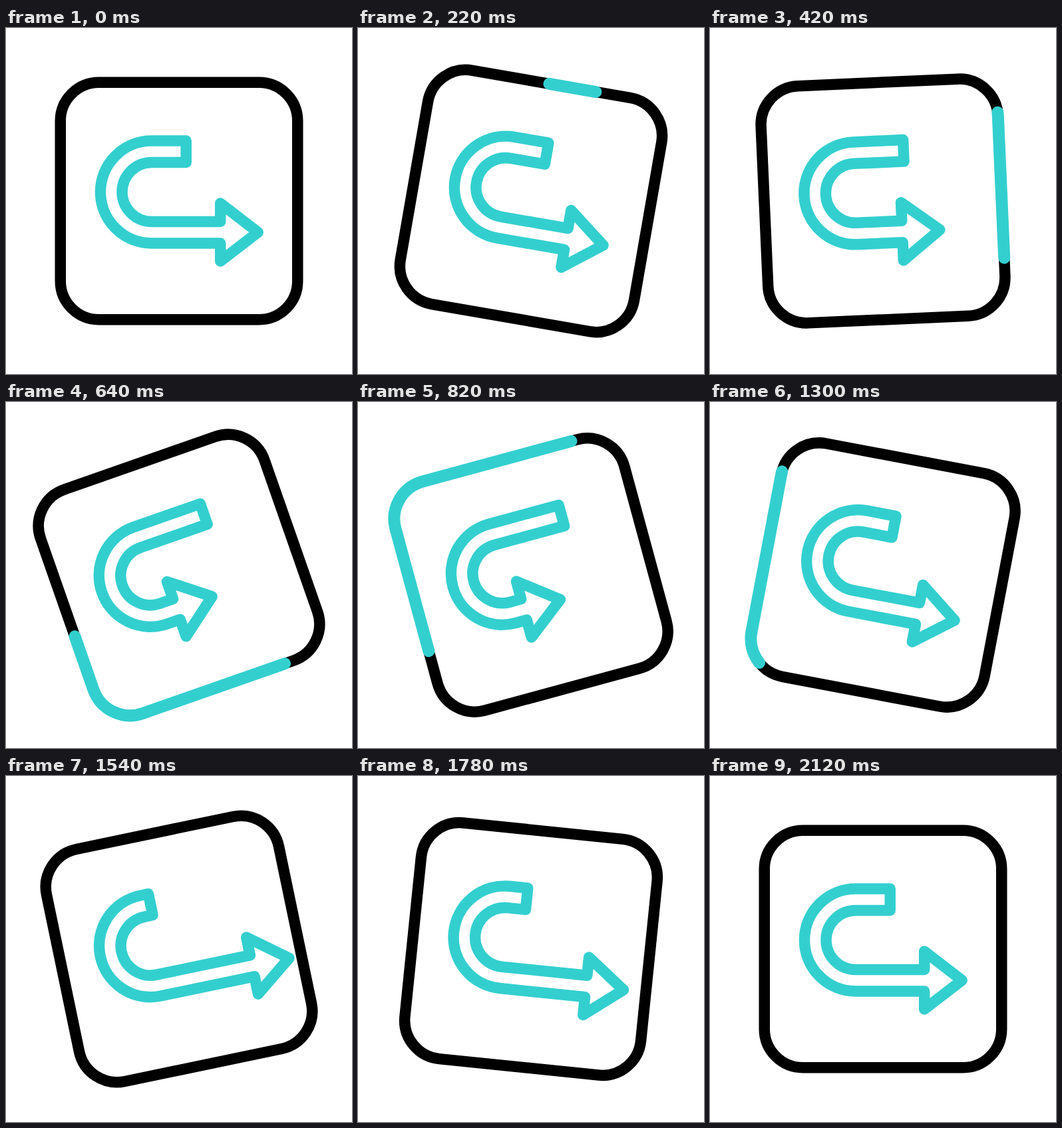
An HTML page that plays this animation: 520x520 px, repeating every 2720 ms.

```html
<!DOCTYPE html>
<html lang="en">
<head>
<meta charset="utf-8">
<title>Turning arrow</title>
<style>
  html, body { margin: 0; height: 100%; overflow: hidden; background: #fff; }
  svg { display: block; width: 100vw; height: 100vh; }
  rect, path { fill: none; stroke: #33cfcf; stroke-width: 16.5; stroke-linecap: round; stroke-linejoin: round; }
  #frame { stroke: #000; }
  #trail { stroke-width: 18; }
</style>
</head>
<body>
<svg viewBox="0 0 520 520">
  <g id="icon">
    <rect id="frame" x="81.75" y="81.75" width="356.5" height="356.5" rx="58"/>
    <rect id="trail" x="81.75" y="81.75" width="356.5" height="356.5" rx="58" pathLength="1"/>
    <path id="arrow"/>
  </g>
</svg>
<script>
const LOOP = 2720, TRAIL_TIME = 1490, TRAIL_ORIGIN = 0.024, LAPS = 2;

// Keys are [time in ms, value]
const TILT = [[0, 0], [200, 10], [700, -20.5], [1200, 16], [1560, -12], [1870, 10.4], [2120, 0]];
const TAIL = [[200, 0], [700, 57], [900, 57], [1545, -39], [2120, 0]];
const HEAD = [[200, 0], [700, -86], [900, -86], [1545, 40.5], [2120, 0]];

const [icon, trail, arrow] = ['icon', 'trail', 'arrow'].map(id => document.getElementById(id));
const smooth = p => p * p * (3 - 2 * p);

function track(keys, t) {
  const i = keys.findIndex(k => k[0] > t);
  if (i === 0) return keys[0][1];
  if (i < 0) return keys[keys.length - 1][1];
  const [t0, a] = keys[i - 1], [t1, b] = keys[i];
  return a + (b - a) * smooth((t - t0) / (t1 - t0));
}

// Cubic Bezier ease with handles (a, 0) and (b, 1)
function bezier(x, a, b) {
  let lo = 0, hi = 1;
  for (let i = 0; i < 24; i++) {
    const p = (lo + hi) / 2, q = 1 - p;
    if (3 * a * p * q * q + 3 * b * p * p * q + p * p * p < x) lo = p; else hi = p;
  }
  return smooth(lo);
}

function drawTrail(u) {
  const start = LAPS * bezier(u, 0.46, 0.914);
  const length = LAPS * smooth(u) - start;
  trail.style.display = u < 1 && length > 0.001 ? '' : 'none';
  trail.setAttribute('stroke-dasharray', `${length} ${1 - length}`);
  trail.setAttribute('stroke-dashoffset', -(start + TRAIL_ORIGIN) % 1);
}

function drawArrow(tail, neck) {
  arrow.setAttribute('d', `M${tail} 169.5H219A77 77 0 0 0 219 323.5H${neck}V350.5
    L${neck + 56.5} 307L${neck} 263.5V291H219A44.5 44.5 0 0 1 219 202H${tail}Z`);
}

function draw(now) {
  const t = now % LOOP;
  icon.setAttribute('transform', `rotate(${track(TILT, t)} 260 260)`);
  drawTrail(Math.min(t / TRAIL_TIME, 1));
  drawArrow(270.7 + track(TAIL, t), 322.2 + track(HEAD, t));
}

let begin;
function tick(now) {
  begin ??= now;
  draw(now - begin);
  requestAnimationFrame(tick);
}
draw(0);
requestAnimationFrame(tick);
</script>
</body>
</html>
```
